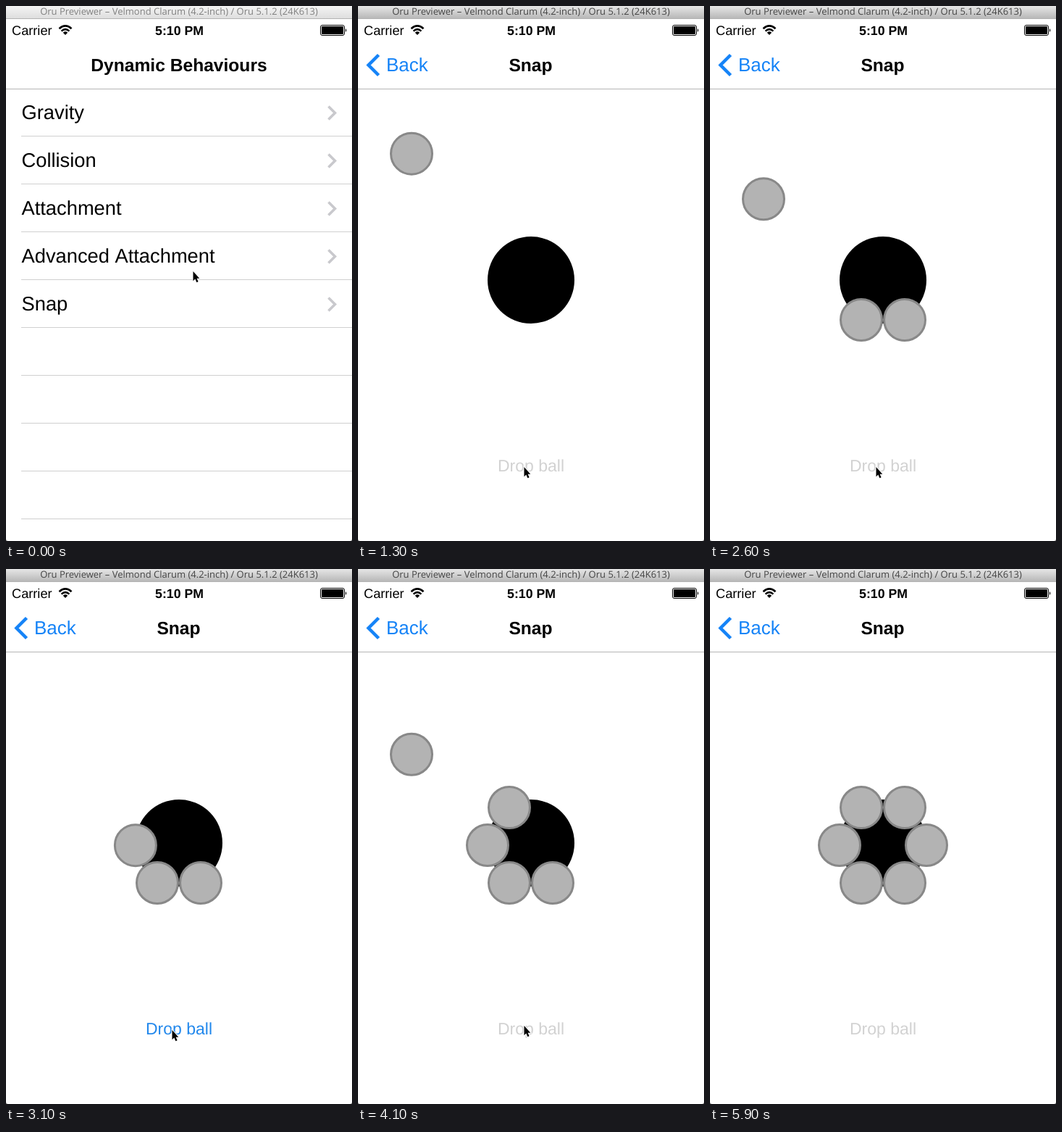
An HTML page that plays this animation: 478 px wide and 738 px high, repeating every 6 s.

```html
<!DOCTYPE html>
<html lang="en">
<head>
<meta charset="utf-8">
<title>Dynamic Behaviours</title>
<style>
  html, body { margin: 0; width: 100%; height: 100%; overflow: hidden; background: #fff; }
  svg { display: block; width: 478px; height: 738px; }
  text { font-family: "Liberation Sans", Arial, sans-serif; white-space: pre;
    text-rendering: geometricPrecision; }
  .bar { font: 13px "Open Sans", "Noto Sans", sans-serif; }
  .row { font-size: 27.3px; font-kerning: none; }
  .head { font-size: 24.6px; font-weight: bold; }
  .mid { text-anchor: middle; }
  .line { fill: none; }
</style>
</head>
<body>
<svg viewBox="0 0 478 738">
  <defs>
    <linearGradient id="idle" x2="0" y2="1">
      <stop stop-color="#f4f4f4"/><stop offset="1" stop-color="#dedede"/>
    </linearGradient>
    <linearGradient id="active" x2="0" y2="1">
      <stop stop-color="#e6e6e6"/><stop offset="1" stop-color="#b8b8b8"/>
    </linearGradient>
  </defs>
  <rect width="478" height="738" fill="#fff"/>

  <g id="list"></g>

  <g id="snap">
    <rect y="115" width="478" height="623" fill="#fff"/>
    <circle cx="239" cy="378" r="60"/>
    <text id="drop" class="mid" x="239" y="642" font-size="23">Drop ball</text>
    <g id="balls" fill="#b3b3b3" stroke="#888" stroke-width="3"></g>
  </g>

  <rect y="17" width="478" height="97" fill="#fff"/>
  <rect y="114" width="478" height="1" fill="#b6b6b6"/>
  <text id="menuTitle" class="head mid" x="239" y="90">Dynamic Behaviours</text>
  <text id="snapTitle" class="head mid" x="238.5" y="90">Snap</text>
  <path id="chevron" class="line" d="M28.5 67.5L14.5 81.5L28.5 95.5" stroke="#1583f7" stroke-width="4.5"/>
  <text id="back" x="39" y="90" font-size="26" fill="#1583f7">Back</text>

  <text x="8" y="40" font-size="18.2">Carrier</text>
  <g class="line" stroke="#000" stroke-width="2.6">
    <path d="M73.5 31.2Q82 23.6 90.5 31.2"/>
    <path d="M76.6 34.6Q82 29.8 87.4 34.6"/>
  </g>
  <path d="M78.8 36.7Q82 33.8 85.2 36.7L82 40z"/>
  <text class="mid" x="239.5" y="40" font-size="17.7" font-weight="bold">5:10 PM</text>
  <rect class="line" x="434.5" y="26.5" width="33" height="14" rx="2.5" stroke="#000"/>
  <rect x="436" y="28" width="30" height="11" rx="1"/>
  <path d="M469 31Q471.6 33.5 469 36z"/>

  <rect id="bar" width="478" height="17"/>
  <rect y="17" width="478" height="1" fill="#b4b4b4"/>
  <text id="barText" class="bar mid" x="239" y="12">Oru Previewer – Velmond Clarum (4.2-inch) / Oru 5.1.2 (24K613)</text>

  <path d="M0 736L2 738H0zM478 736L476 738H478z" fill="#888"/>
  <path id="cursor" d="M.5 1V14.2L3.3 11.6L5.4 16.2L7.6 15.2L5.6 10.7H9.3z"
        stroke="#fff" stroke-width="2" paint-order="stroke"/>
</svg>
<script>
const LOOP = 6000;
const $ = id => document.getElementById(id);
const clamp = v => Math.min(1, Math.max(0, v));
const smooth = p => p * p * (3 - 2 * p);

function add(parent, tag, attrs, text) {
  const el = document.createElementNS("http://www.w3.org/2000/svg", tag);
  for (const k in attrs) el.setAttribute(k, attrs[k]);
  if (text) el.textContent = text;
  return parent.appendChild(el);
}

// Menu rows
const rowH = 66, list = $("list");
const glow = add(list, "rect", { y: 378, width: 478, height: 66, fill: "#d9d9d9" });
for (let i = 0; i < 9; i++)
  add(list, "rect", { x: 21, y: 179 + rowH * i, width: 457, height: 1, fill: "#d0d0d0" });
["Gravity", "Collision", "Attachment", "Advanced Attachment", "Snap"].forEach((name, i) => {
  add(list, "text", { class: "row", x: 21.5, y: 156 + rowH * i }, name);
  const y = 147.5 + rowH * i;
  add(list, "path", { class: "line", d: `M445.5 ${y - 9}L454.5 ${y}L445.5 ${y + 9}`,
    stroke: "#c9c9cd", "stroke-width": 3.6 });
});

// Balls: drop time in ms and the angle of the resting place
const dropX = 74, dropY = 168, gravity = 0.006, fall = 340, snapRate = 0.02;
const drops = [1192, 1761, 2420, 3110, 3930, 4742];
const balls = drops.map((start, i) => {
  const a = (60 + 60 * i) * Math.PI / 180;
  return { start, x: 239 + 60 * Math.cos(a), y: 381 + 60 * Math.sin(a),
    el: add($("balls"), "circle", { r: 28.5 }) };
});

function moveBall(b, t) {
  const age = t - b.start;
  b.el.setAttribute("visibility", age < 0 ? "hidden" : "inherit");
  const f = Math.min(Math.max(age, 0), fall);
  const y = dropY + gravity * f * f / 2;
  const left = age > fall ? Math.exp(-snapRate * (age - fall)) : 1;
  b.el.setAttribute("cx", b.x + (dropX - b.x) * left);
  b.el.setAttribute("cy", b.y + (y - b.y) * left);
}

// Pointer stops: time, x, y
const stops = [
  [0, 258, 365], [230, 250, 408], [420, 250, 408], [1000, 229, 635],
  [3700, 229, 635], [4000, 229, 629], [5150, 229, 629], [5350, 234, 642],
  [5600, 293, 334], [5880, 486, 20], [LOOP, 490, 10]
];

function pointerAt(t) {
  let i = 1;
  while (i < stops.length - 1 && t > stops[i][0]) i++;
  const [t0, x0, y0] = stops[i - 1], [t1, x1, y1] = stops[i];
  const raw = clamp((t - t0) / (t1 - t0));
  const p = t0 < 5350 ? smooth(raw) : raw;
  return [x0 + (x1 - x0) * p, y0 + (y1 - y0) * p];
}

const shift = (el, x, y = 0) => el.setAttribute("transform", `translate(${x} ${y})`);
const fade = (el, v) => el.setAttribute("opacity", v);

function draw(t) {
  const clicked = t >= 260;
  $("bar").setAttribute("fill", clicked ? "url(#active)" : "url(#idle)");
  $("barText").setAttribute("fill", clicked ? "#444" : "#808080");
  fade(glow, clicked ? 1 : 0);

  // Push to the next screen
  const p = 1 - Math.pow(1 - clamp((t - 320) / 430), 3);
  shift(list, -143 * p);
  shift($("snap"), 478 * (1 - p));
  shift($("menuTitle"), -180 * p);
  fade($("menuTitle"), clamp(1 - 1.4 * p));
  shift($("snapTitle"), 239 * (1 - p));
  shift($("back"), 180 * (1 - p));
  for (const id of ["snapTitle", "back", "chevron"]) fade($(id), p);

  balls.forEach(b => moveBall(b, t));
  const last = balls.length - 1;
  const busy = balls.some((b, i) => t >= b.start && (i === last || t < b.start + fall + 80));
  $("drop").setAttribute("fill", busy ? "#d2d2d2" : "#2288ec");

  shift($("cursor"), ...pointerAt(t));
}

function tick() {
  draw(performance.now() % LOOP);
  requestAnimationFrame(tick);
}
tick();
</script>
</body>
</html>
```
